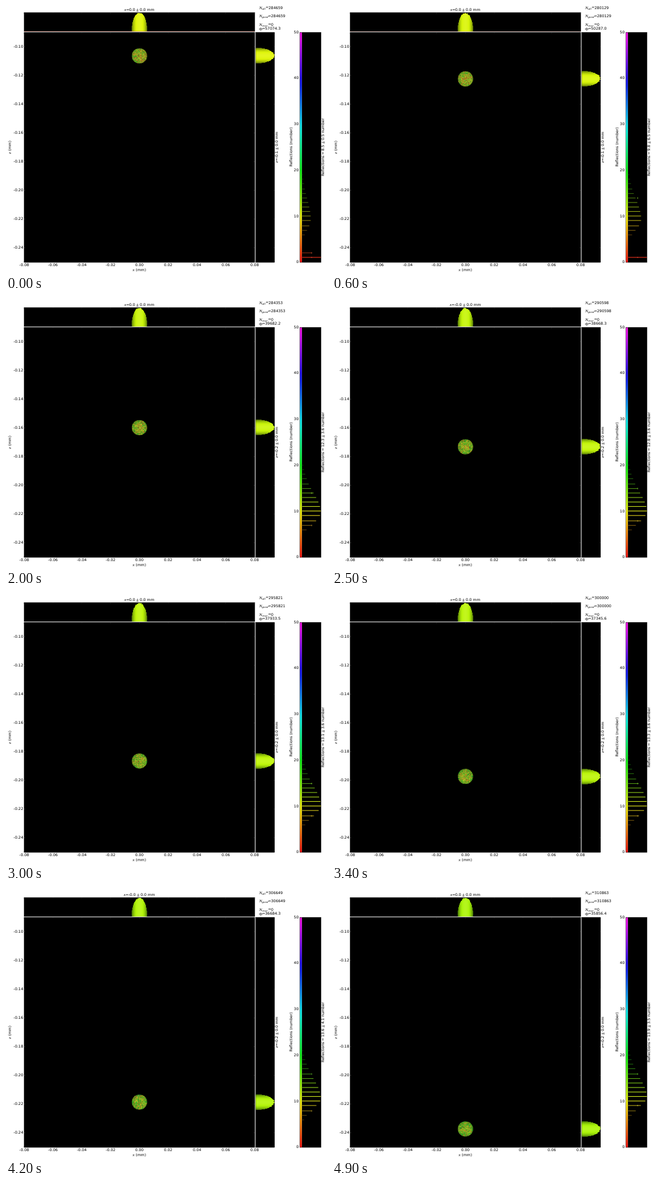
Recreate the animation shown at these times as an HTML page with a canvas. Size 512 px wide and 428 px high, loop 5 s.

```html
<!DOCTYPE html>
<html lang="en">
<head>
<meta charset="utf-8">
<title>Reflections plot</title>
<style>
html, body { margin: 0; width: 100%; height: 100%; overflow: hidden; background: #fff; }
canvas { display: block; }
</style>
</head>
<body>
<canvas id="plot" width="512" height="428"></canvas>
<script>
const ctx = document.getElementById('plot').getContext('2d');
const STEPS = 50, STEP_MS = 100;
const BIN = 369 / 256;
const SANS = '6px "DejaVu Sans", sans-serif';
const MATH = 'italic 7px "Liberation Serif", serif';
const SUB = 'italic 5px "Liberation Serif", serif';
const EQ = '8px "Liberation Serif", serif';
const PM = '\u2009±\u2009';

// Readings at a few steps: step, rays, flux, mean reflections.
const KEYS = [
  [0, 284659, 57074.3, 8.5], [12, 275598, 43499.7, 11.1],
  [20, 284353, 39682.2, 12.3], [25, 290598, 38668.3, 12.8],
  [34, 300000, 37345.6, 13.3], [42, 306649, 36684.3, 13.6],
  [49, 310863, 35856.4, 13.9]
];
// Width of the distribution: up to step, low bar, high bar, half width.
const WIDTHS = [
  [2, 1, 2, '0.5'], [14, 1, 14, '6.5'], [23, 7, 14, '3.6'],
  [38, 8, 15, '3.6'], [46, 8, 16, '4.1'], [50, 9, 16, '3.5']
];

function reading(step, col) {
  let i = 0;
  while (i < KEYS.length - 2 && KEYS[i + 1][0] <= step) i++;
  const a = KEYS[i], b = KEYS[i + 1];
  return a[col] + (b[col] - a[col]) * (step - a[0]) / (b[0] - a[0]);
}

function seeded(seed) {
  let s = seed * 7919 + 12345;
  return () => {
    s = (s + 0x6D2B79F5) | 0;
    let t = Math.imul(s ^ (s >>> 15), 1 | s);
    t = (t + Math.imul(t ^ (t >>> 7), 61 | t)) ^ t;
    return ((t ^ (t >>> 14)) >>> 0) / 4294967296;
  };
}

function rect(x, y, w, h, color) {
  ctx.fillStyle = color;
  ctx.fillRect(x, y, w, h);
}

const hue = (h, light, sat = 100) => `hsl(${h},${sat}%,${light}%)`;
const binTop = n => 411 - (Math.floor(n * 5.12) + 1) * BIN;

function text(str, x, y, align = 'left', font = SANS) {
  ctx.font = font;
  ctx.textAlign = align;
  ctx.textBaseline = 'middle';
  ctx.fillStyle = '#000';
  ctx.fillText(str, x, y);
}

// Centred line made of [string, font] parts.
function mixed(parts, x, y, turned) {
  ctx.save();
  ctx.translate(x, y);
  if (turned) ctx.rotate(-Math.PI / 2);
  const widths = parts.map(([str, font]) => {
    ctx.font = font;
    return ctx.measureText(str).width;
  });
  let left = -widths.reduce((a, b) => a + b) / 2;
  parts.forEach(([str, font], i) => {
    text(str, left, 0, 'left', font);
    left += widths[i];
  });
  ctx.restore();
}

function panel(x, y, w, h, fill) {
  rect(x, y, w, h, fill);
  ctx.strokeStyle = '#000';
  ctx.lineWidth = 0.5;
  ctx.strokeRect(x, y, w, h);
}

function drawAxes() {
  rect(0, 0, 512, 428, '#fff');
  panel(29, 10.6, 369, 30.3, '#000');
  panel(29, 42.2, 369, 368.8, '#000');
  panel(399.5, 42.2, 30.2, 368.8, '#000');
  panel(473.8, 42.2, 30.2, 368.8, '#000');
  const bar = ctx.createLinearGradient(0, 411, 0, 42);
  for (let i = 0; i <= 30; i++) bar.addColorStop(i / 30, hue(i / 30 * 306, 54));
  panel(470.1, 42.2, 3.6, 368.8, bar);

  for (let i = 0; i < 9; i++) {
    const x = 29 + i * 46.1;
    text((-0.08 + i * 0.02).toFixed(2).replace('-0.00', '0.00'), x, 415.7, 'center');
    for (const y of [11, 43, 409]) rect(x - 0.3, y, 0.6, 1.5, '#444');
  }
  for (let i = 0; i < 8; i++) {
    const y = 65 + i * 46.1;
    text((-0.1 - i * 0.02).toFixed(2), 27.5, y, 'right');
    for (const x of [29.3, 396, 428]) rect(x, y - 0.3, 1.5, 0.6, '#444');
  }
  for (let n = 0; n <= 50; n += 10) text(n, 468.2, 410.7 - n * 7.37, 'right');
  mixed([['x', MATH], [' (mm)', SANS]], 213.3, 423);
  mixed([['z', MATH], [' (mm)', SANS]], 6.3, 226.5, true);
  mixed([['Reflections (number)', SANS]], 456, 226, true);
}

function drawBeam(step) {
  const rnd = seeded(step + 1);
  const cx = 213.5, cy = 79.9 + step * 6.153, r = 12.2;
  const base = 65 + step * 0.27;

  ctx.save();
  ctx.beginPath();
  ctx.arc(cx, cy, r, 0, Math.PI * 2);
  ctx.clip();
  for (let y = -r; y < r; y += BIN) {
    for (let x = -r; x < r; x += BIN) {
      const rim = Math.min(1, Math.hypot(x, y) / r);
      const spread = (rnd() + rnd() + rnd() - 1.5) * 40;
      const light = 43 + (rnd() - 0.5) * 12 - 7 * rim ** 4;
      rect(cx + x, cy + y, BIN + 0.3, BIN + 0.3, hue(base - 9 + 22 * rim + spread, light, 66));
    }
  }
  ctx.restore();

  // Projections of the disc on both axes, one pixel per line.
  const px = Math.floor(cx), py = Math.floor(cy);
  for (let i = -12; i <= 12; i++) {
    const u = i / 12.7;
    const profile = Math.sqrt(1 - u * u);
    const color = hue(base + 8 * (1 - profile), 8 + 46 * profile, 92);
    const reach = () => Math.min(30, 30 * profile * (0.96 + rnd() * 0.07));
    const up = reach();
    rect(px + i, 41 - up, 1, up, color);
    rect(399.5, py + i, reach(), 1, color);
  }

  // Unreflected background along the base of the upper panel.
  const haze = Math.max(0, 0.7 - step * 0.06);
  if (haze) rect(29, 40.4, 369, 0.6, `rgba(220,90,60,${haze})`);
}

function drawHistogram(step, width) {
  const direct = Math.max(0, 2.17 - 0.1225 * step);
  const top = Math.max(1, direct);
  const peak = 9.3 + Math.max(0, step - 12) * 0.043;
  const bars = [];
  bars[1] = direct;
  bars[2] = 1.09 * Math.max(0, 1 - step / 4);
  for (let n = 6; n <= 21; n++) {
    const d = n - peak, s = d < 0 ? 2.15 : 4.4;
    bars[n] = Math.exp(-d * d / (2 * s * s));
  }
  bars.forEach((value, n) => {
    const len = value / top;
    if (len < 0.04) return;
    rect(473.8, binTop(n), 30 * len, 1.15, hue(n * 6.12, 10 + 38 * len, 78));
  });
  for (const n of [width[1], width[2]]) {
    rect(488.4, binTop(n) - 0.4, 1.2, 2, hue(n * 6.12, 45, 60));
  }
}

function drawReadings(step, width) {
  const rays = Math.round(reading(step, 1));
  const sign = [3, 5, 9, 12].includes(step % 13) ? '-' : '';
  const z = step < 17 ? '-0.1' : '-0.2';
  mixed([['x', MATH], ['=', EQ], [sign + '0.0', SANS], [PM, EQ], ['0.0 mm', SANS]], 213.3, 6.5);
  mixed([['z', MATH], ['=', EQ], [z, SANS], [PM, EQ], ['0.0 mm', SANS]], 433.6, 226.5, true);
  mixed([['Reflections', SANS], ['\u2009=\u2009', EQ], [reading(step, 3).toFixed(1), SANS],
    [PM, EQ], [width[3] + ' number', SANS]], 507.6, 226.5, true);

  const rows = [['all', rays, 3, 420], ['good', rays, 16.5, 424], ['over', 0, 30, 424]];
  for (const [name, value, y, x] of rows) {
    text('N', 405, y, 'left', MATH);
    text(name, 409.6, y + 1.3, 'left', SUB);
    text('=', x, y, 'right', EQ);
    text(value, x, y);
  }
  text('Φ', 405, 36.7, 'left', MATH.replace('italic ', ''));
  text('=', 414.5, 36.7, 'right', EQ);
  text(reading(step, 2).toFixed(1), 414.5, 36.7);
}

function draw(step) {
  const width = WIDTHS.find(w => step < w[0]);
  drawAxes();
  drawBeam(step);
  drawHistogram(step, width);
  drawReadings(step, width);
}

const start = performance.now();
let shown = -1;
function tick() {
  const step = Math.floor((performance.now() - start) / STEP_MS) % STEPS;
  if (step !== shown) draw(shown = step);
  requestAnimationFrame(tick);
}
tick();
</script>
</body>
</html>
```
